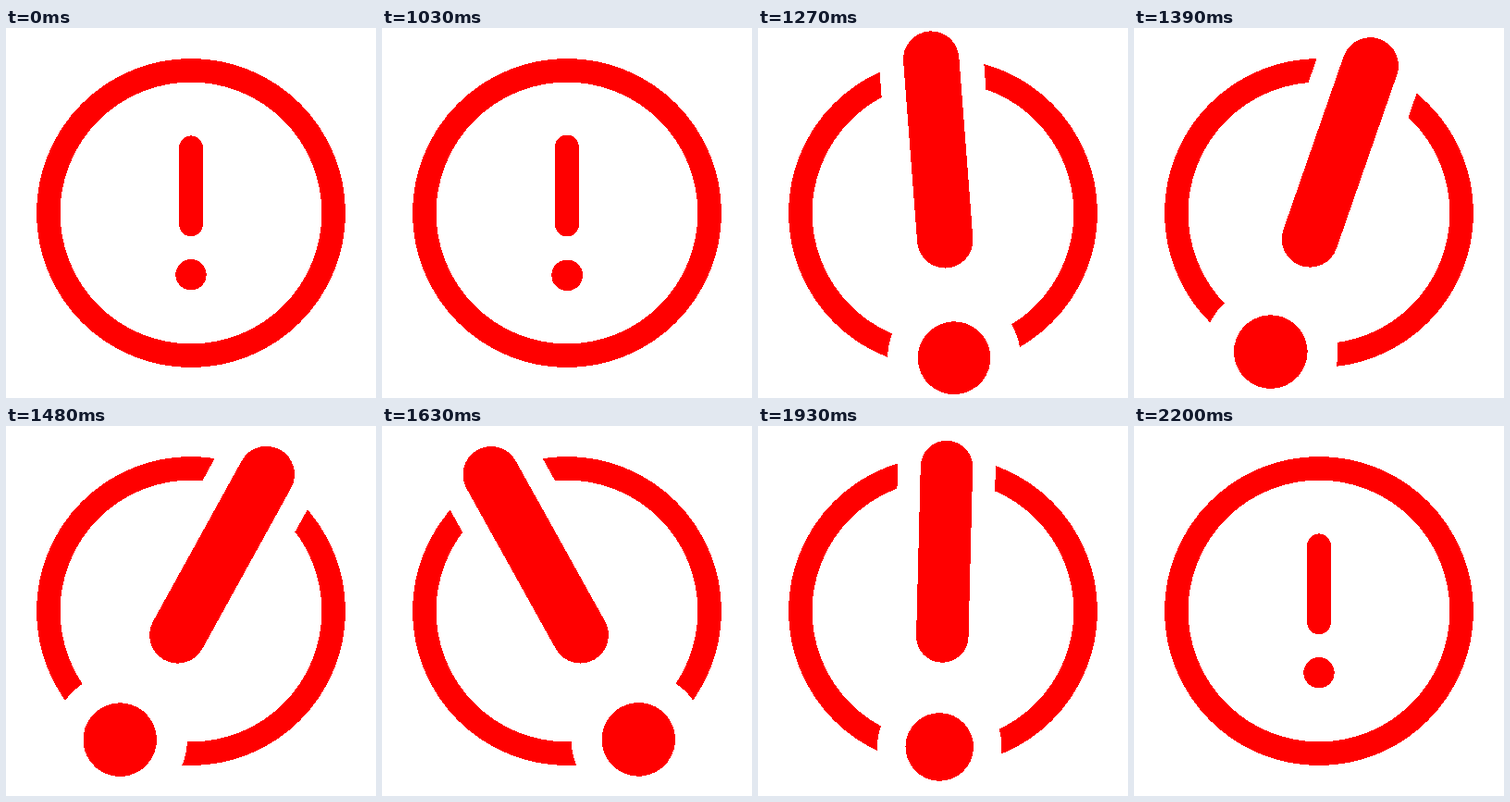
Animation of 400 by 400 pixels, one loop 2230 ms. Source, as an HTML page:

```html
<!DOCTYPE html>
<html lang="en">
<head>
<meta charset="utf-8">
<title>Swinging alert</title>
<style>
  html, body { margin: 0; height: 100%; overflow: hidden; background: #fff; }
  svg { display: block; width: 100%; height: 100%; }
</style>
</head>
<body>
<svg viewBox="0 0 400 400" shape-rendering="crispEdges" fill="none" stroke-linecap="round">
  <circle cx="200" cy="200" r="154.2" stroke="#f00" stroke-width="25.6"/>
  <g id="mark">
    <!-- white halo that cuts the ring -->
    <path d="M0-70.8V12.5" stroke="#fff" stroke-width="48"/>
    <circle cy="66.7" r="30.5" fill="#fff"/>
    <path d="M0-70.8V12.5" stroke="#f00" stroke-width="25.6"/>
    <circle cy="66.7" r="16.7" fill="#f00"/>
  </g>
</svg>
<script>
  const LOOP = 2230, HOLD = 1000, STEP = 30;
  const mark = document.getElementById('mark');

  // [step, value] keys, eased in and out between neighbours
  const SCALE = [[0.55, 1], [9.75, 2.383], [28.5, 2.383], [39.6, 1]];
  const ANGLE = [[0.55, 0], [6.8, -10], [16, 28.9], [21, -29.1], [27.4, 5], [33, 0]];

  function valueAt(keys, x) {
    const next = keys.findIndex(key => key[0] > x);
    if (next === 0) return keys[0][1];
    if (next < 0) return keys[keys.length - 1][1];
    const [x0, y0] = keys[next - 1], [x1, y1] = keys[next];
    const u = (x - x0) / (x1 - x0);
    return y0 + (y1 - y0) * u * u * (3 - 2 * u);
  }

  function draw(now) {
    const step = Math.max(0, Math.floor((now % LOOP - HOLD) / STEP));
    mark.setAttribute('transform',
      `translate(200 200) rotate(${valueAt(ANGLE, step)}) scale(${valueAt(SCALE, step)})`);
    requestAnimationFrame(draw);
  }
  draw(performance.now());
</script>
</body>
</html>
```
